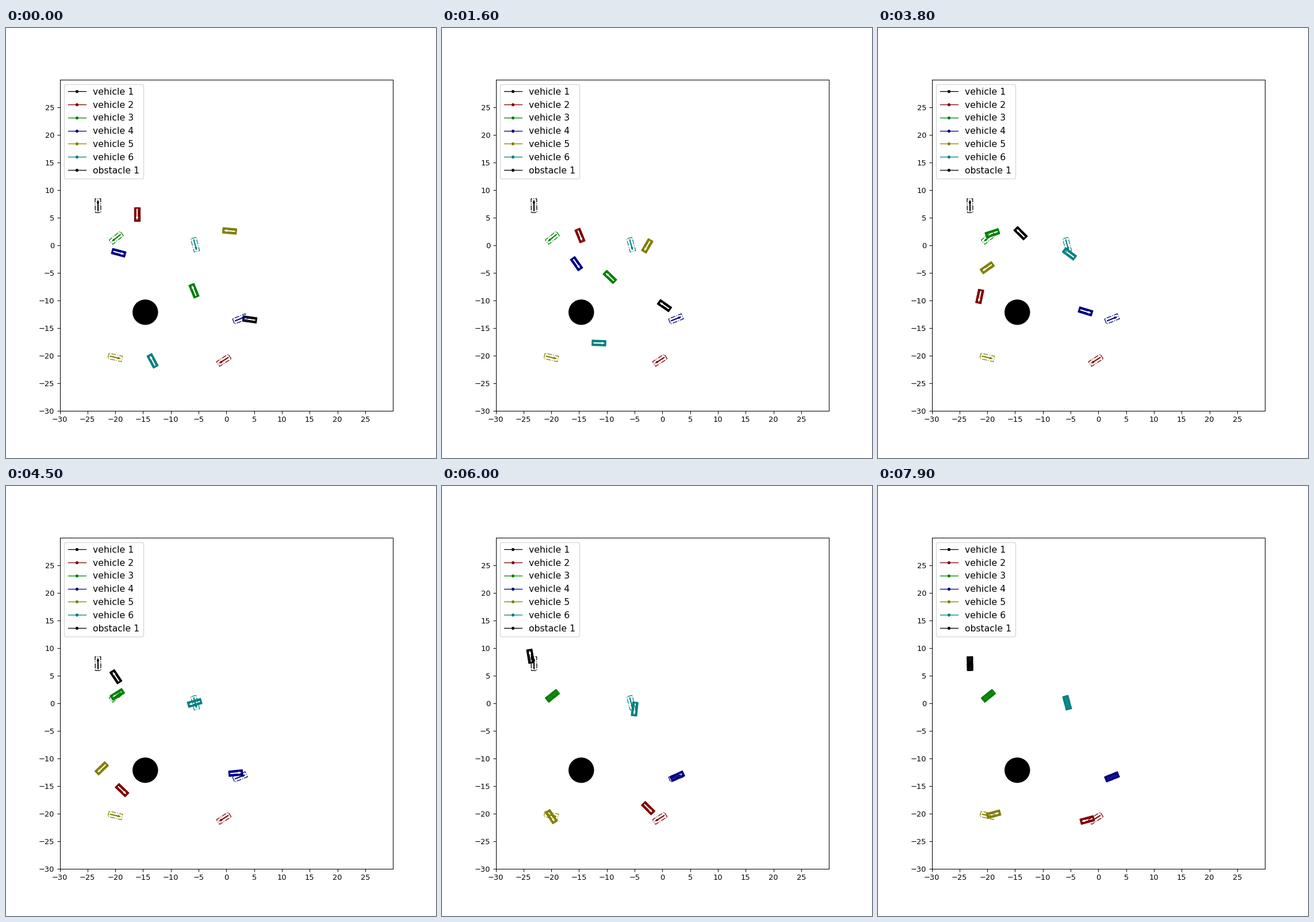
A matplotlib script for the animation above (8000 ms loop, 748x748 px).

```python
import numpy as np
import matplotlib.pyplot as plt
from matplotlib.animation import FuncAnimation
from matplotlib.patches import Circle, Polygon

INCHES, DPI = 8, 93.5
SIZE = INCHES * DPI
FRAMES, STEP = 80, 100
LENGTH, WIDTH = 2.5, 1.0
# Steps at which a vehicle passes its waypoints; the goal follows the last one.
MOMENTS = np.array([1, 16, 26, 38, 52, 68, 79, 90])

fig, ax = plt.subplots(figsize=(INCHES, INCHES), dpi=DPI)
fig.subplots_adjust(left=0.125, right=0.9, bottom=0.11, top=0.88)
ax.set(xlim=(-30, 30), ylim=(-30, 30),
       xticks=np.arange(-30, 30, 5), yticks=np.arange(-30, 30, 5))

BODY = np.array([(-1, 1), (-1, -1), (1, -1), (1, 1)]) * (LENGTH / 2, WIDTH / 2)


def arrow_shape(tail=-0.95, neck=0.5, tip=0.95, shaft=0.04, head=0.15):
    side = [(tail, shaft), (neck, shaft), (neck, head), (tip, 0)]
    return np.array(side + [(x, -y) for x, y in side[-2::-1]])


ARROW = arrow_shape()


def to_data(px, py):
    """Stage pixels, y down, to axis units."""
    x = (px / SIZE - 0.125) / 0.775 * 60 - 30
    y = (1 - py / SIZE - 0.11) / 0.77 * 60 - 30
    return np.stack([x, y], axis=-1)


def ahead(heading):
    a = np.radians(heading)
    return np.stack([np.cos(a), np.sin(a)], axis=-1)


def place(shape, center, heading):
    d = ahead(heading)
    return shape @ np.array([d, (-d[1], d[0])]) + center


def turn_rates(t, heading):
    """Smooth slopes, zero at both ends and wherever the turn reverses."""
    rate = np.gradient(heading, t)
    step = np.diff(heading)
    rate[1:-1][step[:-1] * step[1:] <= 0] = 0
    rate[[0, -1]] = 0
    return rate


def velocities(t, rear, heading):
    """The rear axle rolls along the heading, forward or in reverse."""
    step = np.diff(rear, axis=0)
    speed = np.hypot(*step.T) / np.diff(t) + 1e-9
    mean = 2 * speed[:-1] * speed[1:] / (speed[:-1] + speed[1:])
    d = ahead(heading)
    gear = np.sign(np.sum(step[1:] * d[1:-1], axis=1))
    v = np.zeros_like(rear)
    v[1:-1] = d[1:-1] * (mean * gear)[:, None]
    return v


def hermite(t, p, slope, now):
    now = np.clip(now, t[0], t[-1])
    i = min(np.searchsorted(t, now, side="right"), len(t) - 1) - 1
    h = t[i + 1] - t[i]
    u = (now - t[i]) / h
    return ((1 + 2 * u) * (1 - u) ** 2 * p[i] + u * u * (3 - 2 * u) * p[i + 1]
            + u * (1 - u) * h * ((1 - u) * slope[i] - u * slope[i + 1]))


class Vehicle:
    def __init__(self, color, goal, *waypoints):
        self.color = color
        px, py, heading = np.array([*waypoints, goal], float).T
        self.heading = np.unwrap(heading, period=360)
        center = to_data(px, py)
        self.goal = center[-1], heading[-1]
        self.t = MOMENTS[:len(px)]
        self.rear = center - LENGTH / 2 * ahead(heading)
        self.velocity = velocities(self.t, self.rear, self.heading)
        self.turn = turn_rates(self.t, self.heading)
        self.body = ax.add_patch(Polygon(BODY, fc=color, ec=color, lw=1))
        self.arrow = ax.add_patch(Polygon(ARROW, fc="w", ec="w", lw=1))

    def draw_goal(self):
        ax.add_patch(Polygon(place(BODY, *self.goal), fill=False,
                             ec=self.color, lw=1, ls="dashdot"))
        ax.add_patch(Polygon(place(ARROW, *self.goal), fc=self.color,
                             ec=self.color, lw=1))

    def move(self, now):
        heading = hermite(self.t, self.heading, self.turn, now)
        rear = hermite(self.t, self.rear, self.velocity, now)
        center = rear + LENGTH / 2 * ahead(heading)
        self.body.set_xy(place(BODY, center, heading))
        self.arrow.set_xy(place(ARROW, center, heading))
        return self.body, self.arrow


# Goal, then waypoints, each as x, y and heading.
fleet = [
    Vehicle("black", (160, 309, 91), (424, 507, 172), (387, 483, 145),
            (350, 426, 138), (248, 357, 135), (153, 319, 110), (158, 291, 92)),
    Vehicle("maroon", (379, 578, 213), (228, 324, 270), (240, 361, 292),
            (233, 409, 223), (177, 467, 258), (258, 562, 357),
            (405, 571, 250), (364, 581, 195)),
    Vehicle("green", (192, 365, 219), (327, 457, 112), (292, 433, 136),
            (278, 373, 163), (199, 357, 198)),
    Vehicle("navy", (407, 506, 22), (196, 391, 345), (234, 410, 305),
            (273, 448, 345), (361, 493, 343), (415, 502, 28)),
    Vehicle("olive", (190, 573, 347), (389, 353, 175), (357, 379, 240),
            (307, 420, 182), (190, 417, 215), (167, 557, 241),
            (209, 571, 2), (201, 571, 15)),
    Vehicle("teal", (329, 377, 285), (255, 579, 118), (273, 548, 358),
            (322, 504, 65), (333, 393, 143), (340, 373, 242), (331, 390, 273)),
]

for car in fleet:
    car.draw_goal()
ax.add_patch(Circle((-14.6, -12.15), 2.3, color="black", lw=0))

labels = [(car.color, f"vehicle {n}") for n, car in enumerate(fleet, 1)]
for color, label in labels + [("black", "obstacle 1")]:
    ax.plot([], [], ".-", color=color, lw=1, ms=6, label=label)
ax.legend(loc="upper left", fontsize=12)


def update(frame):
    return [part for car in fleet for part in car.move(frame)]


anim = FuncAnimation(fig, update, frames=FRAMES, interval=STEP,
                     init_func=lambda: update(0), repeat=True,
                     repeat_delay=0, blit=False)
plt.show()
```
